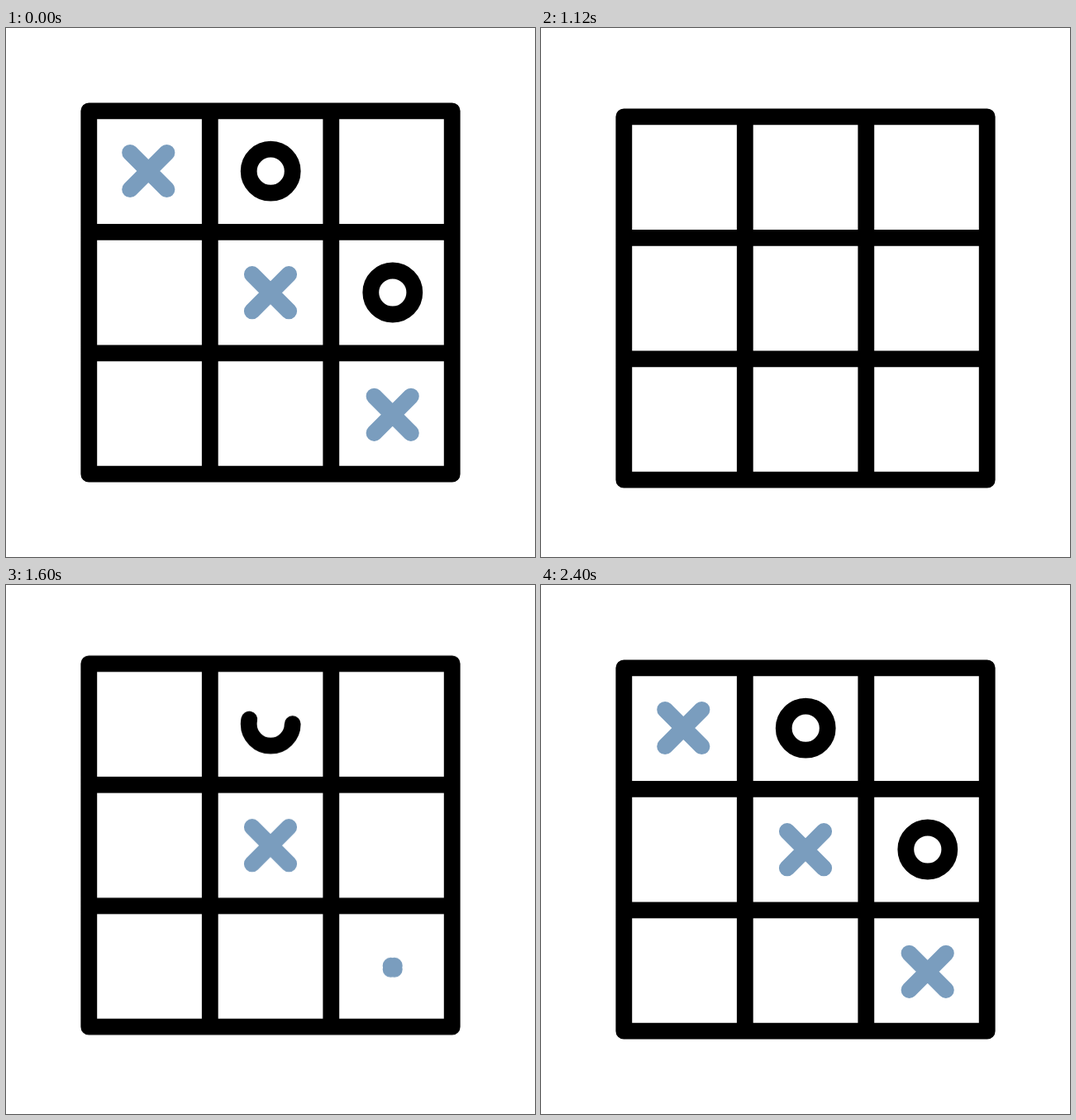
Recreate the animation shown at these times as an HTML page without scripts. Size 640 by 640 pixels, loop 2800 ms.

```html
<!DOCTYPE html>
<html lang="en">
<head>
<meta charset="utf-8">
<title>Noughts and crosses</title>
<style>
  html, body { margin: 0; width: 100%; height: 100%; overflow: hidden; background: #fff; }
  svg { display: block; width: 100%; height: 100%; }

  svg {
    --cross: path("M-22.2 -22.2L22.2 22.2M-22.2 22.2L22.2 -22.2");
    --dot: path("M0 0L0 0M0 0L0 0");
    --ease: cubic-bezier(.333, 0, .667, 1);
  }
  .board, .x, .o { fill: none; stroke: #000; stroke-width: 19.8; stroke-linecap: round; stroke-linejoin: round; }
  .x { stroke: #7a9dbe; d: var(--cross); }
  .o { stroke-dasharray: 360 400; }

  .bob, .x, .o { animation: 2.8s var(--ease) infinite; }
  .bob { animation-name: bob; }
  .x1 { animation-name: x1; }
  .x2 { animation-name: x2; }
  .x3 { animation-name: x3; }
  .o1 { animation-name: o1; }
  .o2 { animation-name: o2; }

  @keyframes bob {
    0% { transform: translateY(0); }
    20.36% { transform: translateY(0); animation-timing-function: cubic-bezier(.39, .575, .565, 1); }
    33.57% { transform: translateY(19px); }
    49.18% { transform: translateY(-13.3px); }
    63.11%, 100% { transform: translateY(0); }
  }

  /* crosses shrink to their centres, then grow back */
  @keyframes x1 {
    0%, 9.29% { d: var(--cross); visibility: visible; }
    26.07%, 69.29% { d: var(--dot); visibility: hidden; }
    84.29%, 100% { d: var(--cross); visibility: visible; }
  }
  @keyframes x2 {
    0%, 15.57% { d: var(--cross); visibility: visible; }
    29.86%, 40.14% { d: var(--dot); visibility: hidden; }
    54.43%, 100% { d: var(--cross); visibility: visible; }
  }
  @keyframes x3 {
    0%, 18.11% { d: var(--cross); visibility: visible; }
    33.14%, 54.43% { d: var(--dot); visibility: hidden; }
    68.71%, 100% { d: var(--cross); visibility: visible; }
  }

  /* rings unwind to three o'clock, then draw clockwise */
  @keyframes o1 {
    0%, 15.36% { stroke-dashoffset: 0; visibility: visible; }
    29.82%, 49.71% { stroke-dashoffset: 360; visibility: hidden; }
    64%, 100% { stroke-dashoffset: 0; visibility: visible; }
  }
  @keyframes o2 {
    0%, 16.18% { stroke-dashoffset: 0; visibility: visible; }
    35.79%, 64.29% { stroke-dashoffset: 360; visibility: hidden; }
    78.57%, 100% { stroke-dashoffset: 0; visibility: visible; }
  }
</style>
</head>
<body>
<svg viewBox="0 0 640 640">
  <g class="bob">
    <path class="board" d="M100.3 100.3H539.7V539.7H100.3ZM246.8 100.3V539.7M393.3 100.3V539.7M100.3 246.8H539.7M100.3 393.3H539.7"/>
    <g transform="translate(172.3 173)"><path class="x x1" d="M-22.2 -22.2L22.2 22.2M-22.2 22.2L22.2 -22.2"/></g>
    <g transform="translate(320 320.2)"><path class="x x2" d="M-22.2 -22.2L22.2 22.2M-22.2 22.2L22.2 -22.2"/></g>
    <g transform="translate(467.7 467.8)"><path class="x x3" d="M-22.2 -22.2L22.2 22.2M-22.2 22.2L22.2 -22.2"/></g>
    <circle class="o o1" cx="320.2" cy="173.2" r="26.5" pathLength="360"/>
    <circle class="o o2" cx="467.8" cy="320" r="26.5" pathLength="360"/>
  </g>
</svg>
</body>
</html>
```
